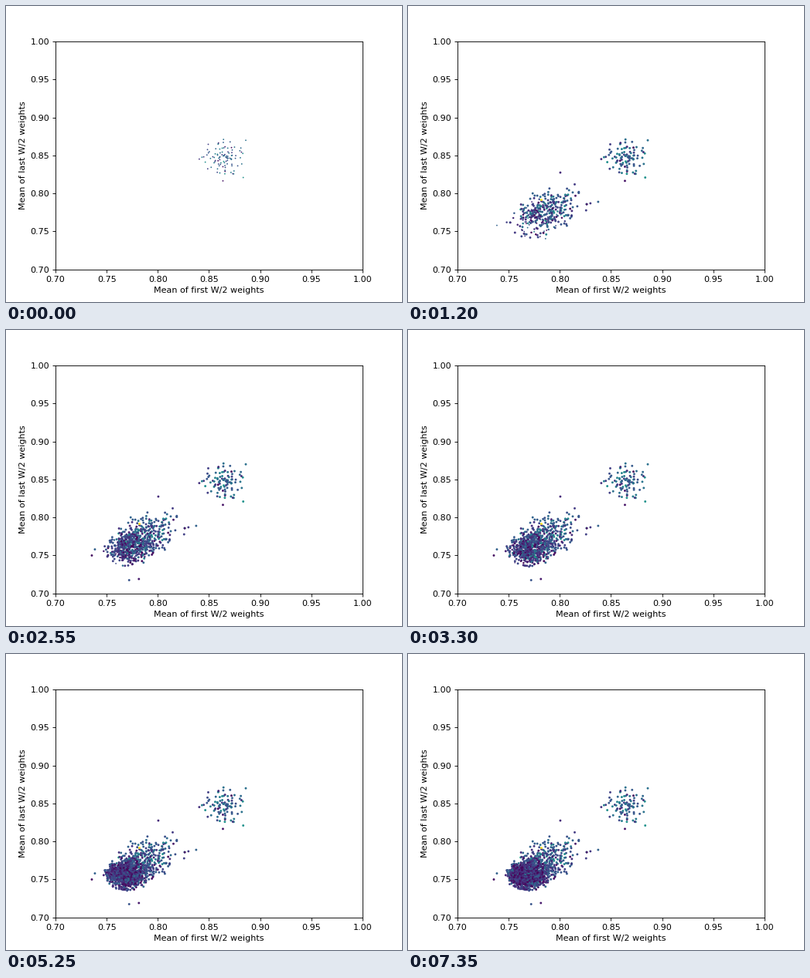
Write a matplotlib script that moves like this. It is 512 by 384 pixels and loops after 7500 ms.

```python
import numpy as np
import matplotlib.pyplot as plt
from matplotlib.animation import FuncAnimation

FRAMES, INTERVAL = 50, 150
GOAL = np.array([0.768, 0.754])
DRIFT = np.array([0.028, 0.033])
AGE_SIZE = np.array([2.6, 5.0, 6.8])  # dots thicken over their first steps

# The few far strays: x, y, step of appearance
STRAYS = np.array([(0.886, 0.870, 0), (0.8835, 0.821, 0), (0.8375, 0.789, 1),
                   (0.8005, 0.8275, 2), (0.7385, 0.758, 8), (0.7355, 0.750, 14),
                   (0.772, 0.7175, 15), (0.7815, 0.719, 15)])
PEAK = (0.7815, 0.7925)

rng = np.random.default_rng(12)


def cloud(n, center, sd, corr=0.0):
    """Correlated normal cloud without its far tail."""
    r = np.sqrt(-2 * np.log(rng.uniform(0.06, 1, n)))
    a = rng.uniform(0, 2 * np.pi, n)
    u, v = r * np.cos(a), r * np.sin(a)
    v = corr * u + np.sqrt(1 - corr ** 2) * v
    return np.column_stack([u, v]) * sd + center


def generation(k):
    """Points of step k: a start cloud, then a cloud settling at GOAL."""
    if k == 0:
        return cloud(98, (0.8635, 0.846), (0.0102, 0.0125))
    drift = np.exp(-(k - 1) / 6)
    sd = 0.0085 + 0.0085 * np.exp(-(k - 1) / 9)
    return cloud(round(45 - 0.4 * k), GOAL + DRIFT * drift,
                 (sd, 0.92 * sd), 0.4 * drift)


steps = [generation(k) for k in range(FRAMES)]
xy = np.vstack(steps + [STRAYS[:, :2]])
birth = np.concatenate([np.repeat(np.arange(FRAMES), [len(s) for s in steps]),
                        STRAYS[:, 2]]).astype(int)
order = np.argsort(birth, kind="stable")
xy, birth = xy[order], birth[order]
shade = np.clip(rng.normal(0.1 + 0.2 * np.exp(-birth / 20), 0.12), 0.02, 0.65)

fig, ax = plt.subplots(figsize=(6.4, 4.8), dpi=80)
ax.set(xlim=(0.7, 1.0), ylim=(0.7, 1.0),
       xlabel="Mean of first W/2 weights", ylabel="Mean of last W/2 weights")
style = dict(cmap="viridis", vmin=0, vmax=1, linewidths=0)
dots = ax.scatter(xy[:, 0], xy[:, 1], c=shade, **style)
peak = ax.scatter(*PEAK, c=[1.0], s=AGE_SIZE[-1], zorder=2, **style)


def update(k):
    n = np.searchsorted(birth, k, side="right")
    dots.set_offsets(xy[:n])
    dots.set_array(shade[:n])
    dots.set_sizes(AGE_SIZE[np.minimum(k - birth[:n], 2)])
    peak.set_visible(k > 0)
    return dots, peak


def init():
    return update(0)


anim = FuncAnimation(fig, update, frames=FRAMES, init_func=init,
                     interval=INTERVAL, repeat=True, repeat_delay=0)
plt.show()
```
